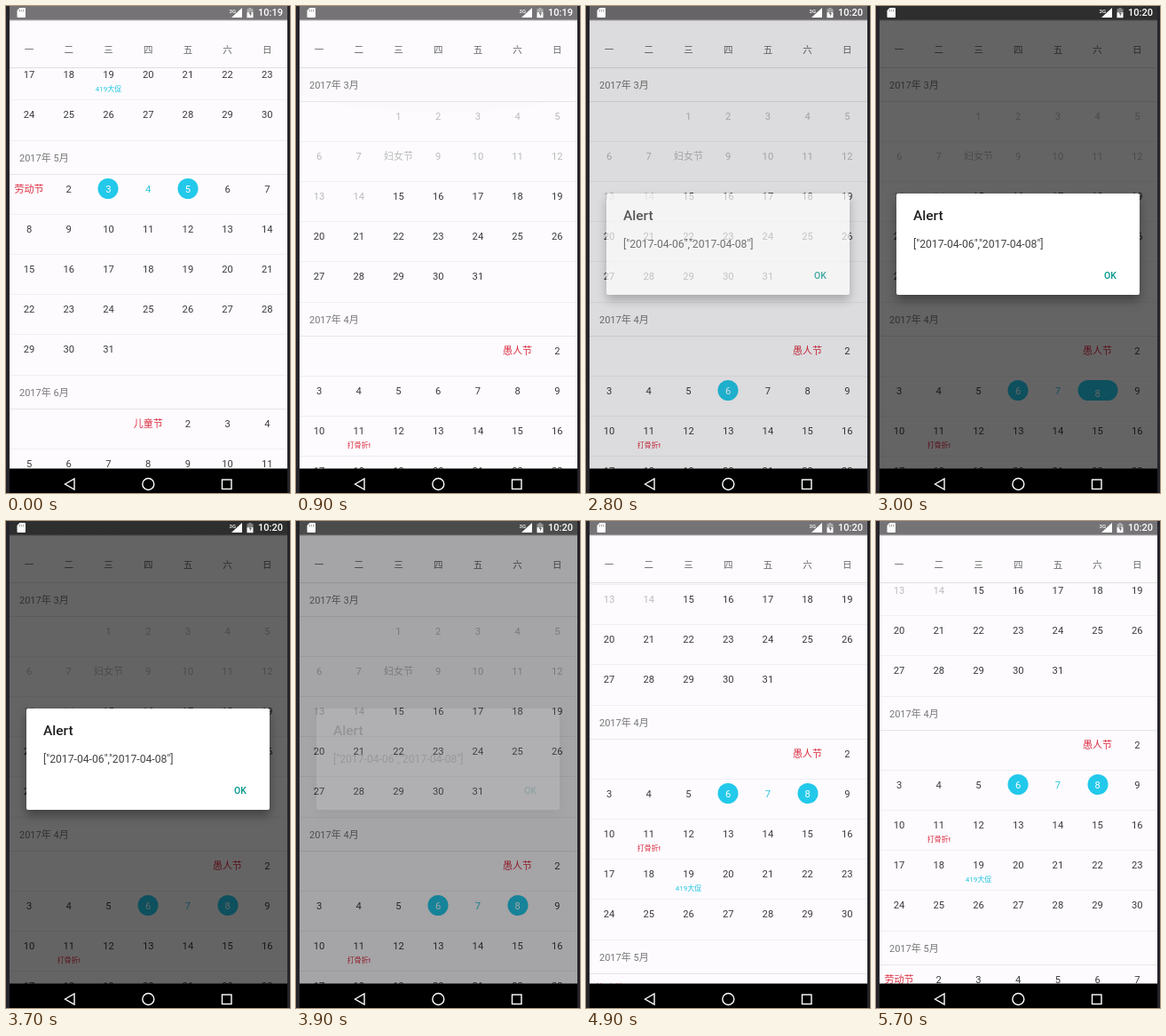
These frames come from a looping animation (320x548 px, 5800 ms). An HTML page:

```html
<!DOCTYPE html>
<html lang="zh">
<head>
<meta charset="utf-8">
<title>Calendar</title>
<style>
  html, body { margin: 0; width: 100%; height: 100%; overflow: hidden; background: #25242a; }
  body { position: relative; font: 11.2px/16px Roboto, "Noto Sans CJK SC", sans-serif; color: #3a393b; }
  body div, body span, svg { position: absolute; white-space: nowrap; }
  #screen { left: 4px; top: 0; width: 313px; height: 521px; background: #fdfbfe; overflow: hidden; }
  #status { width: 313px; height: 17px; background: linear-gradient(#757375 15px, #fdfbfe 17px); }
  #week { top: 17px; width: 313px; height: 52px; color: #666; font-size: 10.5px; border-bottom: 1px solid #dfdee0; }
  #list { top: 70px; width: 313px; height: 451px; overflow: hidden; }
  #glow { left: -40px; top: -50px; width: 393px; height: 100px; border-radius: 50%; background: #000; }
  .title { left: 0; width: 302px; height: 37px; padding-left: 11px; font-size: 11px; line-height: 40px; color: #777; border-bottom: 1px solid #e6e5e8; }
  .line { left: 0; width: 313px; height: 1px; background: #efeef1; }
  .day { width: 44.71px; height: 16px; text-align: center; }
  .day span { left: 0; width: 100%; top: 0; }
  .day .ball { left: 50%; top: -4.5px; width: 23px; height: 23px; border-radius: 12px; background: #22c9ea; transform: translateX(-50%); display: none; }
  .day .note { top: 16px; font-size: 8px; color: #22c5e2; }
  .day .note.red { font-weight: 500; }
  .day.past { color: #bbb; }
  .day.fest:not(.past), .day .note.red { color: #dc2c40; }
  .day.fest { font-size: 11px; }
  .day.mid { color: #2cc5dc; }
  .day.end { color: #fff; }
  .day.end .ball { display: block; }
  #dim { inset: 0; background: #000; }
  #alert { left: 23px; top: 211px; width: 274px; height: 114px; border-radius: 2px; background: #fff; box-shadow: 0 6px 12px rgba(0,0,0,.35); }
  #alert div { left: 19px; }
  #alert .head { top: 17px; font-size: 15.5px; font-weight: 500; color: #212121; }
  #alert .text { top: 49px; font-size: 12.2px; color: #444; }
  #alert .ok { left: 234px; top: 85px; font-size: 10.5px; font-weight: 500; color: #009688; }
  #nav { left: 4px; top: 520px; width: 313px; height: 27px; background: #000 padding-box; border-top: 1px solid rgba(0,0,0,.5); }
  svg { left: 0; top: 0; }
  #clock { left: 284px; top: 0; color: #fff; font-size: 11px; font-weight: 500; }
</style>
</head>
<body>
<div id="screen">
  <div id="status"></div>
  <div id="week"></div>
  <div id="list"><div id="months"></div><div id="glow"></div></div>
  <div id="dim"></div>
</div>
<div id="alert">
  <div class="head">Alert</div>
  <div class="text">["2017-04-06","2017-04-08"]</div>
  <div class="ok">OK</div>
</div>
<div id="nav"></div>
<svg width="320" height="548" fill="#fff">
  <path d="M15.5 2H21q1 0 1 1v9q0 1-1 1h-7.500q-1 0-1-1V5z"/>
  <path d="M15.500 4v2.500M17.500 4v2.500M19.500 4v2.500" stroke="#aaa"/>
  <path d="M254 13h12V2z"/>
  <text x="251.500" y="8" font-size="6" font-weight="500">3G</text>
  <path d="M273.500 2h3v1.200h2v4h-7v-4h2z" opacity=".4"/>
  <path d="M271.500 7.200h7v6h-7z"/>
  <path d="M275.700 5l-2.200 3.700h1.400v3l2.200-3.800h-1.400z" fill="#757375"/>
  <g fill="none" stroke="#fff" stroke-width="1.400">
    <path d="M66.500 538l10.500-6v12z"/>
    <circle cx="160.300" cy="538" r="6.500"/>
    <rect x="243.500" y="533" width="10.500" height="10.500"/>
  </g>
</svg>
<div id="clock"></div>
<script>
const LOOP = 5800, TICK = 100;
const COL = 313 / 7, ROW = 45.2, TITLE = 38;
const FESTIVALS = { '3-8': '妇女节', '4-1': '愚人节', '5-1': '劳动节', '6-1': '儿童节' };
const NOTES = { '4-11': ['打骨折!', 'note red'], '4-19': ['419大促', 'note'] };

const $ = id => document.getElementById(id);
const clamp = x => Math.min(1, Math.max(0, x));
const mix = (a, b, k) => a + (b - a) * k;
const span = (t, from, to) => clamp((t - from) / (to - from));
const smooth = k => k * k * (3 - 2 * k);
const colX = i => i * COL - 0.3;

function add(parent, cls, text, style = {}) {
  const el = document.createElement('div');
  el.className = cls;
  el.textContent = text;
  for (const key in style) el.style[key] = style[key] + 'px';
  parent.append(el);
  return el;
}

// Calendar
const days = {};
[...'一二三四五六日'].forEach((name, i) =>
  add($('week'), 'day', name, { left: colX(i), top: 25 }));

let y = -0.5;
for (let m = 3; m <= 6; m++) {
  const first = (new Date(2017, m - 1, 1).getDay() + 6) % 7;
  const count = new Date(2017, m, 0).getDate();
  const rows = Math.ceil((first + count) / 7);
  add($('months'), 'title', `2017年 ${m}月`, { top: y });
  y += TITLE;
  for (let d = 1; d <= count; d++) {
    const id = `${m}-${d}`, slot = first + d - 1;
    const cell = add($('months'), 'day', '', { left: colX(slot % 7), top: y + Math.floor(slot / 7) * ROW + 9 });
    const ball = add(cell, 'ball', '');
    const label = document.createElement('span');
    label.textContent = FESTIVALS[id] || d;
    cell.append(label);
    cell.classList.toggle('past', m === 3 && d < 15);
    cell.classList.toggle('fest', id in FESTIVALS);
    if (NOTES[id]) {
      const note = document.createElement('span');
      [note.textContent, note.className] = NOTES[id];
      cell.append(note);
    }
    days[id] = { cell, ball, label };
  }
  for (let r = 1; r <= rows; r++) add($('months'), 'line', '', { top: y + r * ROW - 1 });
  y += rows * ROW;
}

function mark(id, cls, on) {
  days[id].cell.classList.toggle(cls, on);
}

// A fresh selection shrinks from the full cell to a round ball
function pick(id, t, start) {
  const on = t >= start;
  const k = smooth(span(t, start + 100, start + 400));
  mark(id, 'end', on);
  days[id].ball.style.width = mix(45, 23, k) + 'px';
  days[id].label.style.top = (on ? mix(3, 0, k) : 0) + 'px';
}

function scrollAt(t) {
  return t < 2000
    ? 446 * (1 - smooth(span(t, 0, 760)))
    : 136 * smooth(span(t, 4394, 5000));
}

function dimAt(t) {
  if (t < 2800) return 0;
  if (t < 3900) return mix(0.13, 0.6, span(t, 2800, 3000));
  return 0.35 * (1 - span(t, 3900, 4200));
}

function alertAt(t) {
  if (t < 2800) return 0;
  if (t < 3900) return mix(0.7, 1, span(t, 2800, 2930));
  return 0.12 * (1 - span(t, 3900, 4000));
}

function draw(t) {
  $('months').style.transform = `translateY(${-Math.round(scrollAt(t))}px)`;
  $('glow').style.opacity = t < 700 ? 0 : 0.012 * (1 - span(t, 800, 1300));
  $('clock').textContent = t < 1100 ? '10:19' : '10:20';

  const old = t < 2300;
  mark('5-3', 'end', old);
  mark('5-4', 'mid', old);
  mark('5-5', 'end', old);
  pick('4-6', t, 2300);
  mark('4-7', 'mid', t >= 2900);
  pick('4-8', t, 2900);

  $('dim').style.opacity = dimAt(t);
  $('alert').style.opacity = alertAt(t);
}

const begin = performance.now();
function frame() {
  const t = (performance.now() - begin) % LOOP;
  draw(Math.floor(t / TICK) * TICK);
  requestAnimationFrame(frame);
}
frame();
</script>
</body>
</html>
```
